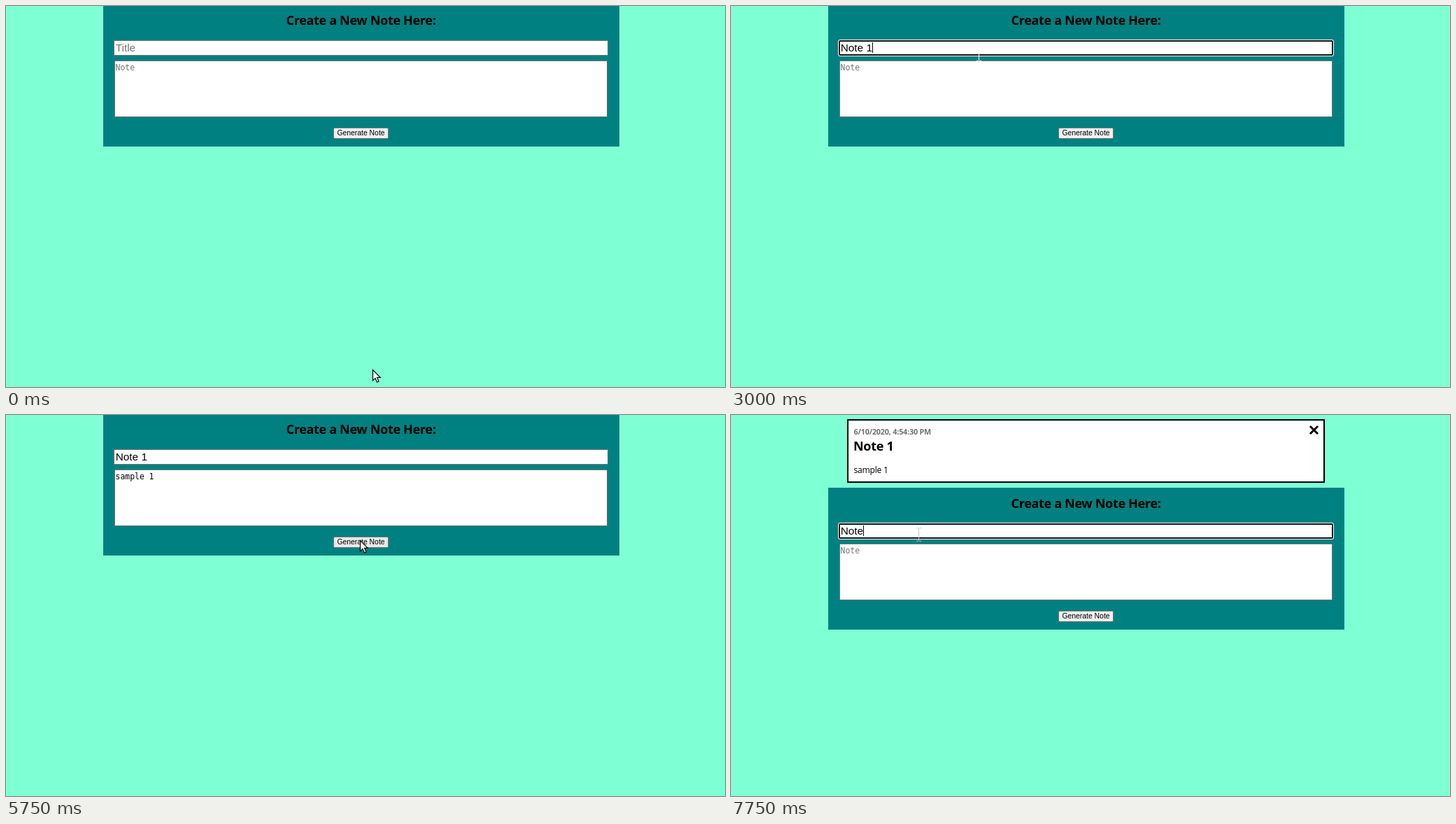
An HTML page that plays this animation: 1028x545 px, repeating every 8 s.

```html
<!DOCTYPE html>
<html lang="en">
<head>
<meta charset="utf-8">
<title>Notes</title>
<style>
  html, body { margin: 0; width: 100%; height: 100%; overflow: hidden; background: #7fffd4; }
  #stage { position: relative; width: 1028px; height: 545px; overflow: hidden; color: #000; }
  #stage div, #stage svg { position: absolute; box-sizing: border-box; white-space: pre; }
  #stage svg { overflow: visible; }

  #card { left: 166px; top: 5.5px; width: 683px; height: 91px; background: #fff; border: 2px solid #000;
          font-family: "Open Sans", "Noto Sans", sans-serif; }
  #card div { left: 7.5px; line-height: 20px; }
  #card .date { top: 6.2px; font-size: 10.8px; font-weight: 700; color: #707070; letter-spacing: -.2px; }
  #card .name { top: 26.2px; left: 7px; font-size: 18px; font-weight: 700; letter-spacing: -.3px; }
  #card .body { top: 61.5px; font-size: 12.2px; letter-spacing: -.28px; }
  #close { left: 660px; top: 8.5px; }

  #panel { left: 138.5px; top: -2px; width: 738px; height: 203px; background: #008080; }
  #panel h2 { position: absolute; margin: 0; top: 12px; width: 100%; text-align: center;
              font: 700 18px/20px "Open Sans", "Noto Sans", sans-serif; letter-spacing: -.32px; }
  .field { background: #fff; border: 1px solid #767676; }
  .field.focus { border: 2px solid #101010; border-radius: 2px; box-shadow: 0 0 0 1px #fff; }
  .field.empty .text { color: #757575; }
  #title { left: 15.5px; top: 51px; width: 707px; height: 21.5px; }
  #note { left: 16.5px; top: 80px; width: 705px; height: 81px; }
  #note.focus { left: 15.5px; width: 707px; top: 79.5px; height: 82px; }
  .line { pointer-events: none; }
  #titleLine { left: 18.2px; top: 51.5px; font: 15.36px/20px "Liberation Sans", Arial, sans-serif; }
  #noteLine { left: 18.1px; top: 80px; font: 11.4px/20px "DejaVu Sans Mono", monospace; }
  .empty + .line { color: #757575; }
  .line i { display: none; position: absolute; right: -1px; top: 2.5px; width: 1px; height: 15px; background: #000; }
  #noteLine i { top: 3px; height: 14px; }
  .line.on i { display: block; }
  #button { left: 329.5px; top: 176px; width: 79px; height: 15.5px; background: #efefef; border: 1px solid #767676;
            border-radius: 2px; text-align: center; font: 10.4px/14px "Liberation Sans", Arial, sans-serif; }
  #button.hot { background: #e9e9e9; }
</style>
</head>
<body>
<div id="stage">
  <div id="card">
    <div class="date">6/10/2020, 4:54:30 PM</div>
    <div class="name">Note 1</div>
    <div class="body">sample 1</div>
    <svg id="close" width="11" height="11"><path d="M1 1L10 10M10 1L1 10" stroke="#000" stroke-width="3" stroke-linecap="square"/></svg>
  </div>
  <div id="panel">
    <h2>Create a New Note Here:</h2>
    <div id="title" class="field"></div>
    <div id="titleLine" class="line"><span></span><i></i></div>
    <div id="note" class="field"></div>
    <div id="noteLine" class="line"><span></span><i></i></div>
    <div id="button">Generate Note</div>
  </div>
  <svg id="arrow" width="12" height="19"><path d="M.5 .5V15.6L4 12.4L6.4 18L9 16.9L6.6 11.4H11.2Z" fill="#fff" stroke="#000" stroke-width="1.2"/></svg>
  <svg id="beam" width="7" height="20"><path d="M0 .7H2.6M4.4 .7H7M3.5 1V19M0 19.3H2.6M4.4 19.3H7" fill="none" stroke-width="1"/></svg>
</div>
<script>
  const $ = id => document.getElementById(id);
  const LOOP = 8000;

  const start = {
    x: 524, y: 520, pointer: 'arrow', ink: '#fff',
    title: '', note: '', focus: '', caret: false, saved: false, close: false, hot: false
  };

  // Each step changes only the listed properties.
  const steps = [
    [250, { x: 510, y: 462 }],
    [500, { x: 468, y: 345 }],
    [750, { x: 416, y: 212 }],
    [1000, { x: 372, y: 106, pointer: 'beam', ink: '#000' }],
    [1250, { x: 354, y: 66, ink: '#fff', focus: 'title', caret: true }],
    [1500, { y: 69 }],
    [1750, { caret: false }],
    [2000, { title: 'No', caret: true }],
    [2250, { title: 'Note' }],
    [2750, { title: 'Note ' }],
    [3000, { title: 'Note 1' }],
    [3250, { focus: 'note' }],
    [3750, { note: 's' }],
    [4000, { note: 'sam' }],
    [4250, { note: 'sample' }],
    [4500, { note: 'sample ' }],
    [4750, { note: 'sample 1' }],
    [5250, { x: 410, y: 112, ink: '#000' }],
    [5500, { x: 492, y: 168, pointer: 'arrow' }],
    [5750, { x: 506, y: 179, focus: '', caret: false, hot: true }],
    [6000, { x: 289, y: 135, title: '', note: '', saved: true, hot: false }],
    [6250, { x: 268, y: 171, pointer: 'beam', ink: '#c8c8c8' }],
    [6500, { focus: 'title', caret: true }],
    [6750, { caret: false }],
    [7250, { title: 'N', caret: true, close: true }],
    [7500, { title: 'Not' }],
    [7750, { title: 'Note' }]
  ];

  const show = (id, on) => { $(id).style.display = on ? 'block' : 'none'; };

  function drawField(id, hint, s) {
    const focused = s.focus === id;
    $(id).classList.toggle('focus', focused);
    $(id).classList.toggle('empty', !s[id]);
    const line = $(id + 'Line');
    line.firstChild.textContent = s[id] || hint;
    line.classList.toggle('on', focused && s.caret);
    const bar = line.lastChild.style;
    bar.left = s[id] ? 'auto' : '0';
    bar.right = s[id] ? '-1px' : 'auto';
  }

  function draw(s) {
    show('card', s.saved);
    show('close', s.close);
    $('panel').style.top = (s.saved ? 104 : -2) + 'px';
    drawField('title', 'Title', s);
    drawField('note', 'Note', s);
    $('button').classList.toggle('hot', s.hot);
    show('arrow', s.pointer === 'arrow');
    show('beam', s.pointer === 'beam');
    const p = $(s.pointer).style;
    const beam = s.pointer === 'beam';
    p.left = s.x - (beam ? 3 : 0) + 'px';
    p.top = s.y - (beam ? 10 : 0) + 'px';
    $('beam').style.stroke = s.ink;
  }

  let last = -1;
  const origin = performance.now();
  function tick(now) {
    const t = Math.max(0, now - origin) % LOOP;
    const past = steps.filter(step => step[0] <= t);
    if (past.length !== last) {
      last = past.length;
      draw(Object.assign({}, start, ...past.map(step => step[1])));
    }
    requestAnimationFrame(tick);
  }
  tick(origin);
</script>
</body>
</html>
```
